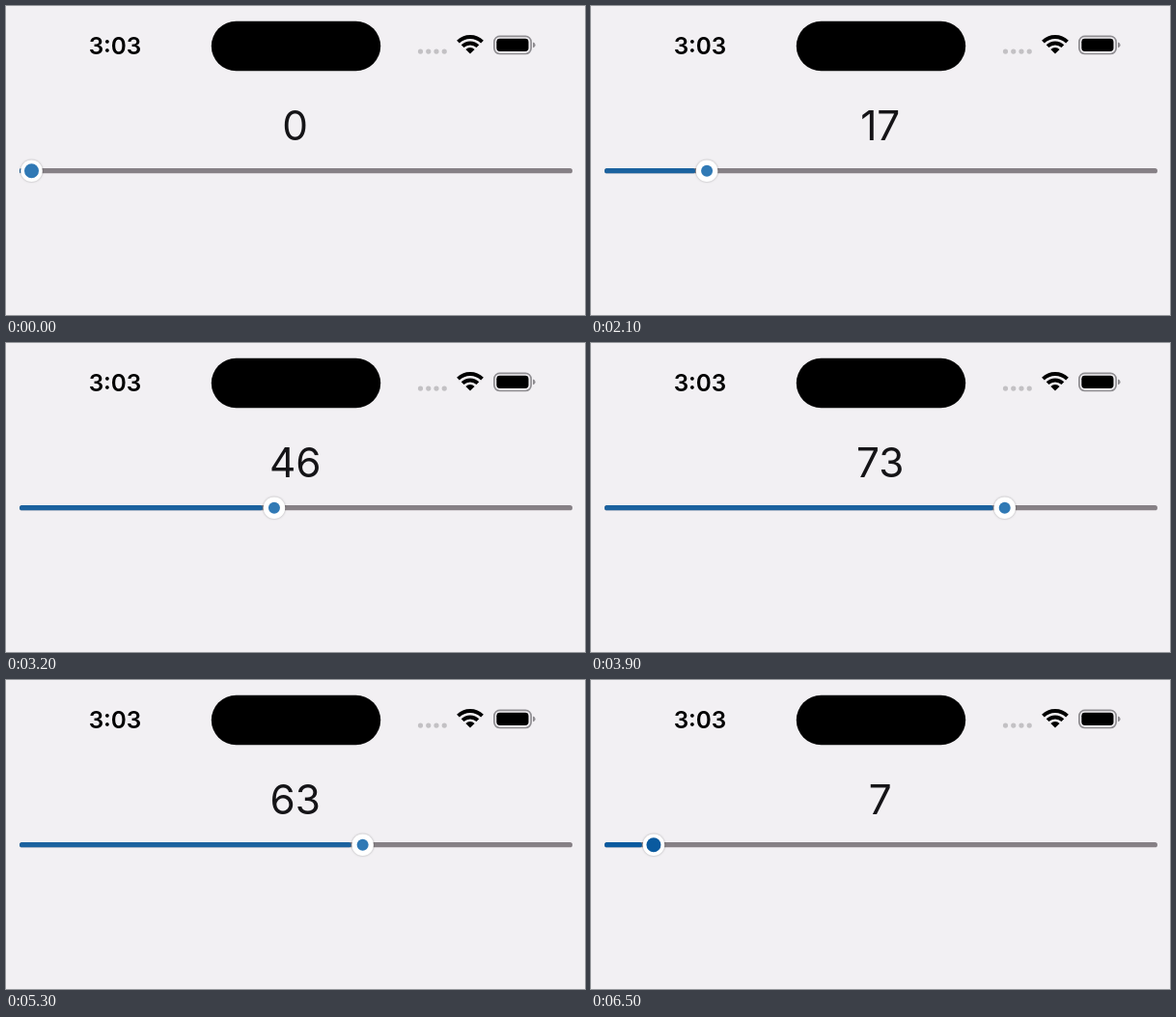
An HTML page for the animation above (6600 ms loop, 600 by 320 pixels).

```html
<!DOCTYPE html>
<html lang="en">
<head>
<meta charset="utf-8">
<title>Slider</title>
<style>
  html, body { margin: 0; width: 100%; height: 100%; overflow: hidden; background: #f2f0f3; }
  svg { display: block; width: 600px; height: 320px; }
  text { font-family: Inter, "Liberation Sans", sans-serif; text-anchor: middle; }
  .clock { font-size: 24.3px; font-weight: 600; }
  .value { font-size: 42.3px; fill: #151417; }
  .halo { filter: drop-shadow(0 .5px 1px rgba(0, 0, 0, .3)); }
</style>
</head>
<body>
<svg viewBox="0 0 600 320">
  <rect width="600" height="320" fill="#f2f0f3"/>

  <text class="clock" x="113" y="49.8">3:03</text>
  <rect x="212.8" y="15.8" width="175.4" height="51.4" rx="25.7"/>
  <path d="M429.5 47.1h26" stroke="#c3c1c4" stroke-width="5.2" stroke-linecap="round" stroke-dasharray="0 8.25"/>
  <g transform="translate(481 49.6)">
    <path d="M-12.5 -12.5A17.7 17.7 0 0 1 12.5 -12.5M-7.9 -7.9A11.2 11.2 0 0 1 7.9 -7.9" fill="none" stroke="#000" stroke-width="3.9"/>
    <path d="M0 0L-4.6 -4.6A6.5 6.5 0 0 1 4.6 -4.6Z"/>
  </g>
  <rect x="505.9" y="31.3" width="38.2" height="18.2" rx="5.8" fill="none" stroke="#8f8d91" stroke-width="1.7"/>
  <rect x="508.3" y="33.8" width="33.2" height="13.2" rx="3.4"/>
  <path d="M546 37.6Q548.6 38.4 548.6 40.4T546 43.2Z" fill="#8f8d91"/>

  <text class="value" id="value" x="299.7" y="138.8">0</text>
  <rect x="14" y="168" width="573" height="5.3" rx="2.65" fill="#868085"/>
  <rect id="fill" x="14" y="168" height="5.3" rx="2.65"/>
  <g id="thumb">
    <circle class="halo" r="11.3" fill="#fff"/>
    <circle id="dot"/>
  </g>
</svg>
<script>
  const LOOP = 6600, STEP = 100, RELEASE = 6300;
  const $ = id => document.getElementById(id);
  const value = $('value'), fill = $('fill'), thumb = $('thumb'), dot = $('dot');

  // Turning points of the drag and of the dot's size: [time, value]
  const drag = [[1600, 0], [2300, 21], [2730, 7], [3670, 84.6], [4510, 19.4], [5300, 62.5], [6300, 7]];
  const size = [[1400, 7.5], [1600, 6], [6200, 6], [6500, 7.5]];

  // Sine ease between neighbouring turning points
  function tween(keys, t) {
    const i = keys.findIndex(([time]) => time > t);
    if (i < 0) return keys[keys.length - 1][1];
    if (i === 0) return keys[0][1];
    const [t0, a] = keys[i - 1], [t1, b] = keys[i];
    return a + (b - a) * (1 - Math.cos(Math.PI * (t - t0) / (t1 - t0))) / 2;
  }

  function draw(now) {
    const t = Math.floor((now % LOOP) / STEP) * STEP;
    const v = tween(drag, t);
    const x = 26.5 + 5.49 * v;
    value.textContent = Math.round(v);
    fill.setAttribute('width', Math.max(2, x - 26));
    fill.setAttribute('fill', t < RELEASE ? '#1b629f' : '#0a5a9f');
    thumb.setAttribute('transform', `translate(${x} 170.8)`);
    dot.setAttribute('r', tween(size, t));
    dot.setAttribute('fill', t <= RELEASE ? '#3079b5' : '#0a5a9f');
  }

  const start = performance.now();
  function tick() {
    draw(performance.now() - start);
    requestAnimationFrame(tick);
  }
  tick();
</script>
</body>
</html>
```
